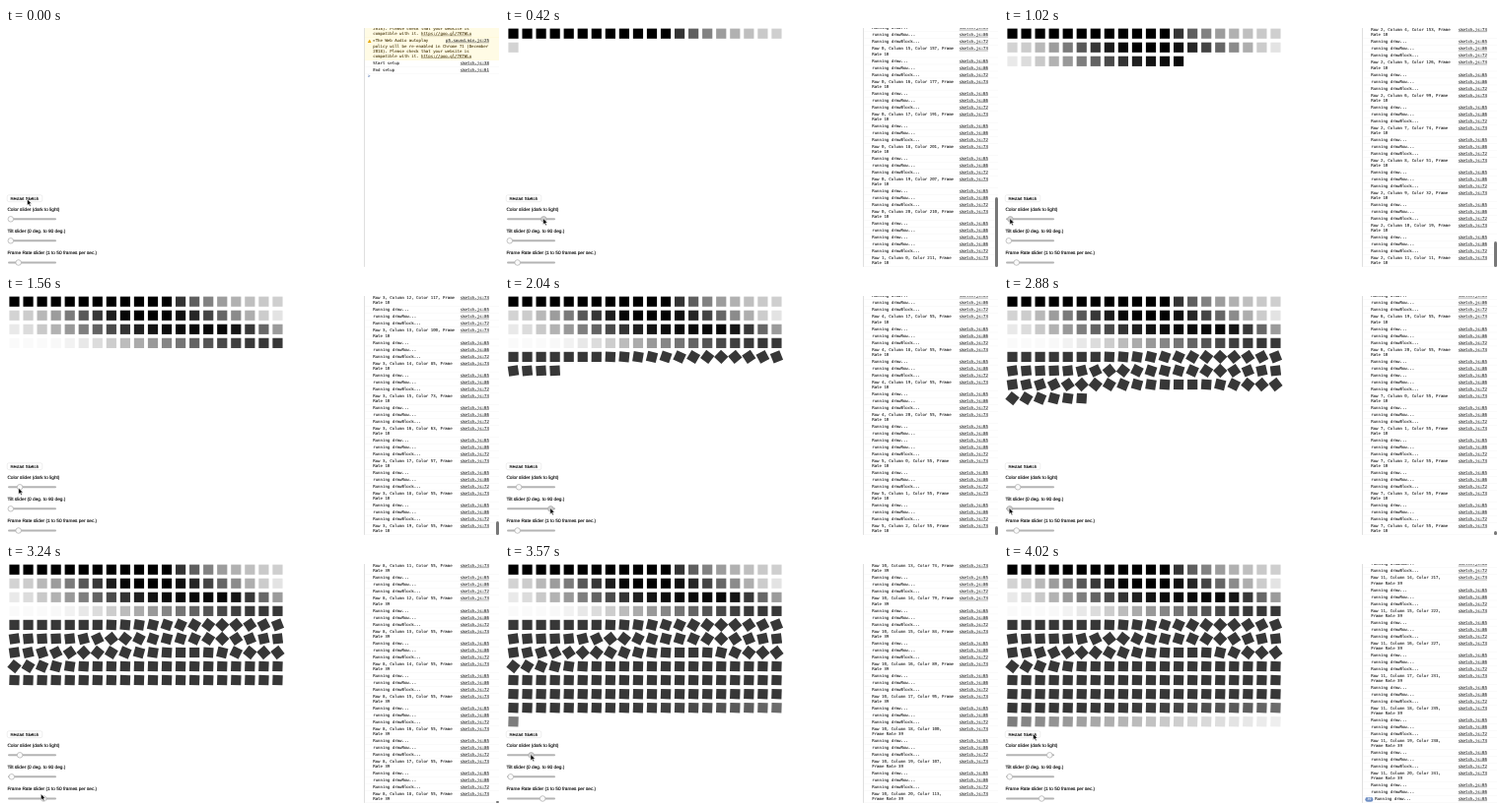
An HTML page that plays this animation: 500x244 px, repeating every 4050 ms.

```html
<!DOCTYPE html>
<html lang="en">
<head>
<meta charset="utf-8">
<title>Sketch with sliders</title>
<style>
  html, body { margin: 0; width: 100%; height: 100%; overflow: hidden; background: #fff; }
  #stage { position: relative; width: 500px; height: 244px; overflow: hidden; background: #fff; text-rendering: geometricPrecision; }
  svg { position: absolute; inset: 0; }
  svg text { font-family: "Liberation Sans", Arial, sans-serif; fill: #000; stroke: #000; stroke-width: .1; }
  /* Laid out at full size, then shrunk as a whole */
  #console {
    position: absolute; left: 363px; top: 0; width: 373px; height: 660px;
    transform: scale(.368); transform-origin: 0 0;
    box-sizing: border-box; border-left: 2px solid #d4d4d4; overflow: hidden;
    display: flex; flex-direction: column;
    font: 11px/14px "DejaVu Sans Mono", monospace; color: #1c1c1c; -webkit-text-stroke: .2px;
  }
  #console.full { justify-content: flex-end; }
  .row { flex: none; position: relative; padding: 2px 28px 2px 23px; border-bottom: 1px solid #f0f0f0; }
  #console:not(.full) .row:first-child { margin-top: -6px; }
  .warn { background: #fffbe5; border-color: #fff3c4; color: #4a3a10; }
  .src { float: right; margin-left: 12px; color: #222; }
  u, .src { text-decoration: underline; }
  .icon { position: absolute; left: 8px; top: 4px; width: 11px; height: 10px; background: #e8ac16; clip-path: polygon(50% 0, 100% 100%, 0 100%); }
  .prompt { color: #4668a8; padding: 1px 9px; border: 0; }
  .badge {
    display: inline-block; width: 22px; margin: 0 5px 0 -16px; border-radius: 7px;
    background: #6f8fc4; color: #fff; font-size: 10px; line-height: 13px; text-align: center;
  }
  #bar { position: absolute; left: 496.5px; bottom: 1px; width: 3px; border-radius: 1.5px; background: #777; }
</style>
</head>
<body>
<div id="stage">
  <div id="console"></div>
  <div id="bar"></div>
  <svg width="500" height="244" viewBox="0 0 500 244">
    <g id="blocks"></g>
    <rect x="1.2" y="169.8" width="35.6" height="6.8" rx="1.6" fill="#fff" stroke="#dcdcdc" stroke-width=".5"/>
    <text x="4.4" y="174.6" font-size="4.4">Restart Sketch</text>
    <g id="sliders"></g>
    <path id="cursor" d="M0 0V6.2L1.5 4.9L2.6 7.2L3.6 6.8L2.6 4.5H4.5Z" fill="#000" stroke="#fff" stroke-width=".5"/>
  </svg>
</div>
<script>
  const LOOP = 4050, FRAME = 30;
  const COLS = 21, SHOWN = 20, ROWS = 12;
  const CYCLE = COLS + 1;               // a row ends with one step that draws no block
  const LAST = ROWS * CYCLE - 2;
  const LOG_LAG = 14;
  const $ = id => document.getElementById(id);

  const smooth = k => k * k * (3 - 2 * k);
  const easeOut = k => 1 - (1 - k) ** 3;

  // Sketch step reached at time t; the sketch speeds up once the frame rate is raised
  const stepAt = t => t < FRAME ? -1 : .5 + .0556 * (t - FRAME) + .083 * Math.max(0, t - 3050);

  // Slider drags as [step, value, easing towards it]
  const COLOR = [[11, 0], [22, 211, easeOut], [31, 0], [32.5, 0], [42.5, 242], [55.5, 10],
    [59, 8], [66, 250], [68, 250], [84, 55], [225, 55], [266, 246]];
  const TILT = [[93, 0], [113, 87], [121, 15], [130, 86], [145, 0], [151, 52], [160, 2]];
  const RATE = [[168, 10], [188, 39]];

  function valueAt(keys, step) {
    const i = keys.findIndex(k => k[0] > step);
    if (i <= 0) return keys.at(i)[1];
    const [s0, v0] = keys[i - 1], [s1, v1, ease = smooth] = keys[i];
    return v0 + (v1 - v0) * ease((step - s0) / (s1 - s0));
  }

  const SLIDERS = [
    { label: 'Color slider (dark to light)', y: 194.3, keys: COLOR, min: 0, max: 255 },
    { label: 'Tilt slider (0 deg. to 90 deg.)', y: 216.3, keys: TILT, min: 0, max: 90 },
    { label: 'Frame Rate slider (1 to 50 frames per sec.)', y: 238.5, keys: RATE, min: 1, max: 50 }
  ];
  const thumbX = (s, step) => 4.8 + 43 * (valueAt(s.keys, step) - s.min) / (s.max - s.min);

  // Where the cursor stays: from, to, and a slider or a point on the button
  const STAYS = [
    { from: 0, to: 60, point: [21.5, 174] },
    { from: 200, to: 1535, slider: 0 },
    { from: 1680, to: 2900, slider: 1 },
    { from: 3040, to: 3195, slider: 2 },
    { from: 3440, to: 3760, slider: 0 },
    { from: 3990, to: LOOP, point: [29.5, 172.5] }
  ];

  function stayPoint(stay, step) {
    if (stay.point) return stay.point;
    const s = SLIDERS[stay.slider];
    return [thumbX(s, step) - .6, s.y - .8];
  }

  function cursorAt(t, step) {
    const i = STAYS.findLastIndex(s => s.from <= t), stay = STAYS[i];
    const a = stayPoint(stay, step);
    if (t <= stay.to) return { at: a, held: stay.slider };
    const next = STAYS[i + 1], b = stayPoint(next, step);
    const k = smooth((t - stay.to) / (next.from - stay.to));
    return { at: a.map((v, j) => v + (b[j] - v) * k) };
  }

  const row = (text, src, kind = '') =>
    `<div class="row ${kind}">${src ? `<span class="src">${src}</span>` : ''}${text}</div>`;
  const log = (text, line) => row(text, 'sketch.js:' + line);

  const TAIL = '2018). Please check that your website is compatible with it. <u>https://goo.gl/7K7WLu</u>';
  const HEAD = row(TAIL, '', 'warn') +
    row('<i class="icon"></i>▸The Web Audio autoplay policy will be re-enabled in Chrome 71 (December ' + TAIL,
      'p5.sound.min.js:25', 'warn') +
    log('Start setup', 38) + log('End setup', 61);
  const PROMPT = row('&gt;', '', 'prompt');

  function stepLog(step) {
    const col = step % CYCLE;
    const begin = log('Running draw...', 65) + log('running drawRow...', 86);
    if (col === COLS) return begin;
    const color = Math.round(valueAt(COLOR, step)), rate = Math.round(valueAt(RATE, step));
    return begin + log('Running drawBlock...', 72) +
      log(`Row ${Math.floor(step / CYCLE)}, Column ${col}, Color ${color}, Frame Rate ${rate}`, 73);
  }

  function drawConsole(step) {
    const newest = Math.min(LAST + 1, Math.floor(step));
    const full = newest >= 5;
    let html = full ? '' : HEAD;
    for (let s = Math.max(0, newest - 8); s <= newest; s++) html += stepLog(s);
    const repeats = Math.floor(step) - LAST - 1;
    if (repeats > 0) html += log(`<span class="badge">${repeats}</span>Running draw...`, 65);
    $('console').className = full ? 'full' : '';
    $('console').innerHTML = full ? html : html + PROMPT;
    const content = 46 + 33 * (newest + 1);
    $('bar').style.height = (full ? Math.max(0, 64000 / content - 8) : 0) + 'px';
  }

  const blocks = [];
  function build() {
    let html = '';
    for (let r = 0; r < ROWS; r++) {
      for (let c = 0; c < SHOWN; c++) {
        const step = r * CYCLE + c, v = Math.round(valueAt(COLOR, step));
        html += `<rect x="-5.1" y="-5.1" width="10.2" height="10.2" fill="rgb(${v},${v},${v})"
          transform="translate(${8.5 + 14.05 * c} ${5.7 + 14.05 * r}) rotate(${valueAt(TILT, step)})"/>`;
        blocks.push({ step });
      }
    }
    $('blocks').innerHTML = html;
    blocks.forEach((b, i) => b.el = $('blocks').children[i]);

    $('sliders').innerHTML = SLIDERS.map(s => `
      <text x="1.4" y="${s.y - 8.8}" font-size="4.75">${s.label}</text>
      <rect x="2" y="${s.y - 1}" width="49" height="2" rx="1" fill="#b4b4b4"/>
      <circle cy="${s.y}" r="2.8" stroke="#a0a0a0" stroke-width=".6"/>`).join('');
    $('sliders').querySelectorAll('circle').forEach((c, i) => SLIDERS[i].thumb = c);
  }

  function draw(t) {
    const step = t < FRAME ? -1 : stepAt(t + LOG_LAG);
    for (const b of blocks) b.el.setAttribute('visibility', b.step <= step ? 'visible' : 'hidden');
    const { at, held } = cursorAt(t, step);
    SLIDERS.forEach((s, i) => {
      s.thumb.setAttribute('cx', thumbX(s, step));
      s.thumb.setAttribute('fill', i === held ? '#d0d0d0' : '#fafafa');
    });
    $('cursor').setAttribute('transform', `translate(${at})`);
    drawConsole(stepAt(t));
  }

  build();
  const start = performance.now();
  let shown = -1;
  function tick() {
    const t = Math.floor((performance.now() - start) % LOOP / FRAME) * FRAME;
    if (t !== shown) draw(shown = t);
    requestAnimationFrame(tick);
  }
  tick();
</script>
</body>
</html>
```
